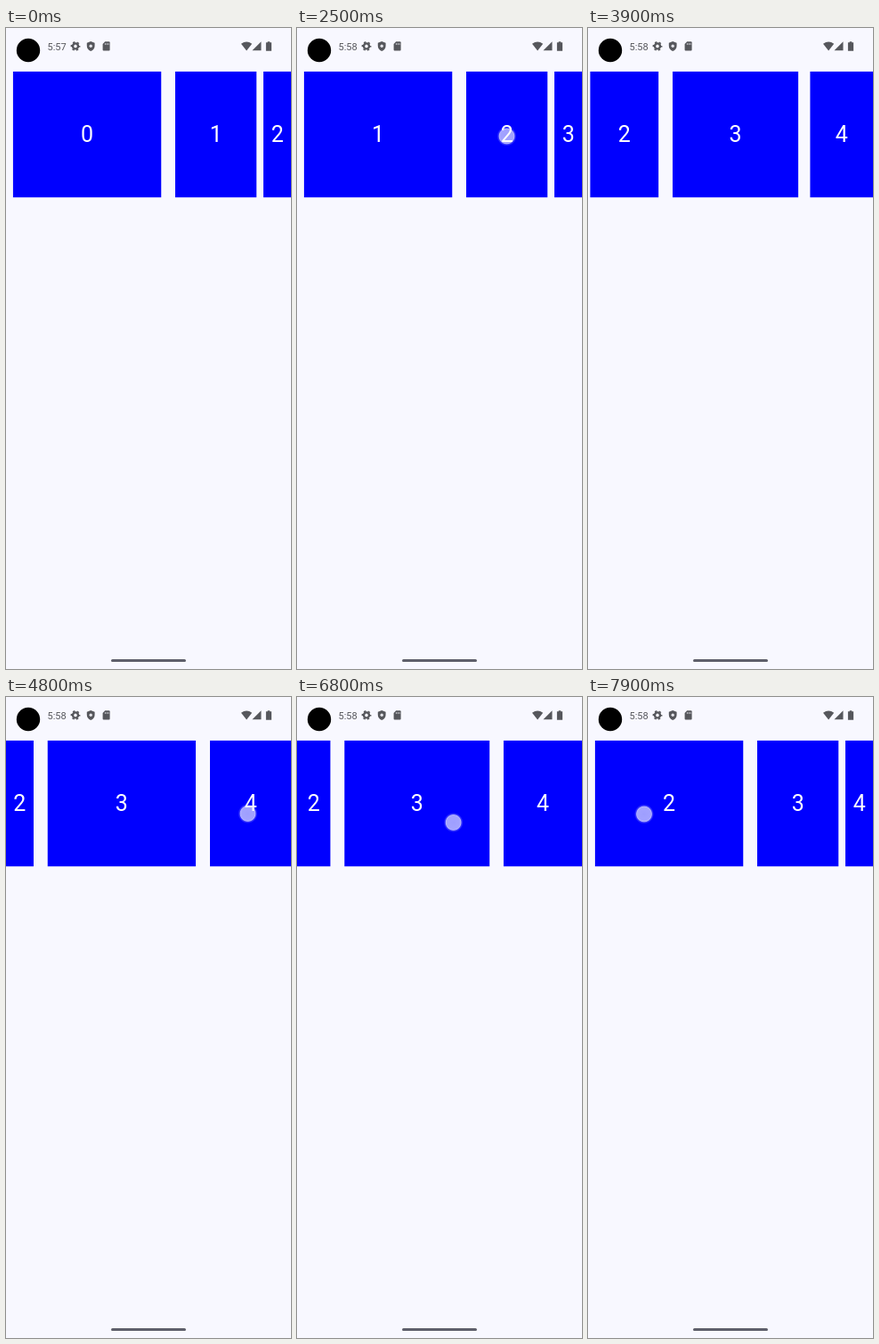
Animation, 320 px wide and 720 px high, one loop 8 s. Source, as an HTML page:

```html
<!DOCTYPE html>
<html lang="en">
<head>
<meta charset="utf-8">
<title>Carousel</title>
<style>
  html, body { margin: 0; width: 100%; height: 100%; overflow: hidden; background: #f8f8ff; }
  svg { display: block; }
  text { font-family: Roboto, sans-serif; }
</style>
</head>
<body>
<svg id="stage" width="320" height="720" viewBox="0 0 320 720">
  <defs>
    <radialGradient id="glow">
      <stop offset="0" stop-color="#fff" stop-opacity=".62"/>
      <stop offset=".68" stop-color="#fff" stop-opacity=".64"/>
      <stop offset=".76" stop-color="#fff" stop-opacity=".72"/>
      <stop offset=".84" stop-color="#ccf" stop-opacity=".3"/>
      <stop offset="1" stop-color="#ccf" stop-opacity="0"/>
    </radialGradient>
  </defs>
  <rect width="320" height="720" fill="#f8f8ff"/>

  <circle cx="25" cy="25" r="13.2"/>
  <g fill="#56575c">
    <text id="clock" x="46.5" y="24.6" font-size="11">5:57</text>
    <g transform="translate(78 20.4)" fill="none" stroke="#56575c">
      <circle r="3" stroke-width="2.4"/>
      <circle r="4.6" stroke-width="1.6" stroke-dasharray="2.4 2.417" stroke-dashoffset="1.2"/>
    </g>
    <path d="M95.2 15 l4.4 1.7 v3.2 q0 4.2 -4.4 6 q-4.4 -1.8 -4.4 -6 v-3.2 z"/>
    <circle cx="95.2" cy="20.2" r="1.7" fill="#e4e4ea"/>
    <path d="M111.2 15.3 h4.4 q1 0 1 1 v8.2 q0 1 -1 1 h-6 q-1 0 -1 -1 v-6.4 z"/>
    <path d="M111.4 17 v2 M113.2 17 v2 M115 17 v2" stroke="#d8d8de" stroke-width=".8"/>
    <path d="M264 17.8 q6.1 -4.8 12.2 0 l-6.1 7.6 z"/>
    <path d="M286.5 15.3 v10 h-10 z"/>
    <path d="M293.7 15.2 h2.6 v1.1 h1.8 v9.4 h-6.2 v-9.4 h1.8 z"/>
  </g>

  <g id="items"></g>
  <circle id="touch" r="11" fill="url(#glow)"/>
  <rect x="118" y="709" width="84" height="3" rx="1.5" fill="#5f606b"/>
</svg>
<script>
const LOOP = 8000, STEP = 100, COUNT = 5;
const $ = id => document.getElementById(id);

// Left and right edges of each slot; the outer slots are off stage.
const LEFT_EDGE = [-16, -8];
const startSlots = [LEFT_EDGE, [7.7, 174.5], [190, 281.5], [289, 320.5], [328, 336]];
const middleSlots = [LEFT_EDGE, [-0.5, 31], [46.5, 213.3], [229, 320.5]];
const endSlots = [LEFT_EDGE, [-1.5, 29.7], [37.5, 129], [145, 312]];

// Scroll stops 0 to 2 put that item first; 3 and 4 shift towards the end of the list.
const swipes = [
  { down: 1300, start: 1200, end: 1900, from: 0, to: 1, x: 240, y: 125, dx: -175, dy: 4 },
  { down: 2500, start: 2600, end: 3300, from: 1, to: 2, x: 235.5, y: 121.5, dx: -175, dy: 4 },
  { down: 3600, start: 3700, end: 4200, from: 2, to: 3, x: 255, y: 136.5, dx: -130, dy: 4 },
  { down: 4800, start: 4900, end: 5400, from: 3, to: 4, x: 271.5, y: 131, dx: -130, dy: 4 },
  { down: 6000, start: 6400, end: 7300, from: 4, to: 2, x: 60, y: 131, dx: 221, dy: 19, lead: 1.874 },
  { down: 7900, start: 8000, end: 8600, from: 2, to: 1, x: 63, y: 131.5, dx: 175, dy: 4 }
];

function progress({ start, end, lead = 1.3 }, t) {
  const p = Math.min(1, Math.max(0, (t - start) / (end - start)));
  return 1 - (1 - p ** lead) ** 3;
}

function slotAt(stop, item) {
  const slots = [startSlots, startSlots, startSlots, middleSlots, endSlots][stop];
  const index = item - Math.min(stop, 2) + 1;
  return slots[Math.min(slots.length - 1, Math.max(0, index))];
}

$("items").innerHTML = Array.from({ length: COUNT }, (_, i) => `
  <svg y="48.7" height="141.8"><rect width="100%" height="100%" fill="#00f"/>
  <text x="50%" y="79.8" font-size="25" fill="#fff" text-anchor="middle">${i}</text></svg>`).join("");
const items = [...$("items").children];

function draw(t) {
  let scroll = 0;
  for (const s of swipes)
    if (t >= s.start) scroll = s.from + (s.to - s.from) * progress(s, t);

  const stop = Math.min(3, Math.floor(scroll)), mix = scroll - stop;
  items.forEach((el, i) => {
    const a = slotAt(stop, i), b = slotAt(stop + 1, i);
    const [left, right] = a.map((v, k) => v + (b[k] - v) * mix);
    el.setAttribute("x", left);
    el.setAttribute("width", right - left);
  });

  const held = swipes.find(s => t >= s.down && progress(s, t) < 0.6);
  $("touch").style.display = held ? "" : "none";
  if (held) {
    const p = progress(held, t);
    $("touch").setAttribute("cx", held.x + held.dx * p);
    $("touch").setAttribute("cy", held.y + held.dy * p);
  }
  $("clock").textContent = t < 1600 ? "5:57" : "5:58";
}

// The screen refreshes ten times a second.
function tick() {
  draw(Math.floor(performance.now() % LOOP / STEP) * STEP);
  requestAnimationFrame(tick);
}
tick();
</script>
</body>
</html>
```
